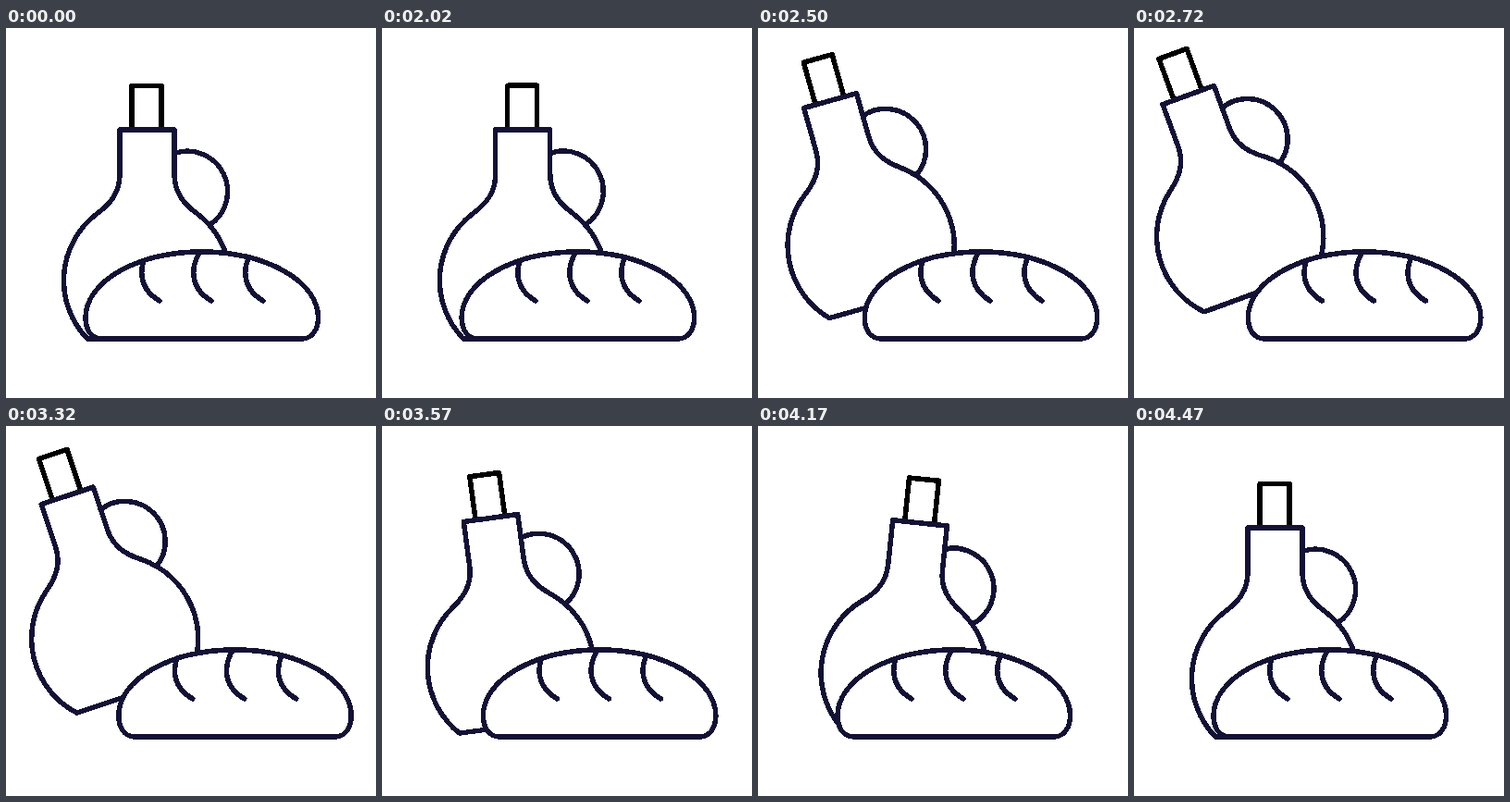
An HTML page with a canvas that plays this animation: 400x400 px, repeating every 4500 ms.

```html
<!DOCTYPE html>
<html lang="en">
<head>
<meta charset="utf-8">
<title>Bottle and bread</title>
<style>
  html, body { margin: 0; width: 100%; height: 100%; overflow: hidden; background: #fff; }
  canvas { display: block; width: 100vmin; height: 100vmin; }
</style>
</head>
<body>
<canvas id="stage" width="400" height="400"></canvas>
<script>
const SIZE = 400;
const ctx = document.getElementById('stage').getContext('2d', { willReadFrequently: true });
const LOOP = 4500;
const NAVY = [19, 18, 52];
const BLACK = [0, 0, 0];
const PIVOT = { x: 213, y: 325 };

const cap = new Path2D('M136 109 V62.5 H168 V109');
const handle = new Path2D('M182 135.5 A43.5 43.5 0 0 1 220 213');
const bottle = new Path2D(
  'M123 110 V158 C123 178 113 190 98 201 A90.5 90.5 0 0 0 88 336 H217 ' +
  'A90.5 90.5 0 0 0 207 201 C192 190 182 178 182 158 V110 Z');
const bread = new Path2D(
  'M104 336 C92 336 86 326 86 313 A125.75 71 0 0 1 337.5 313 C337.5 326 331 336 320 336 Z');
const slash = new Path2D('M209 243 C198 262 201 283 222 295');

// Easing along a curve with horizontal tangents; a and b are the handle positions.
function ease(x, a, b) {
  if (x <= 0) return 0;
  if (x >= 1) return 1;
  let lo = 0, hi = 1;
  for (let i = 0; i < 24; i++) {
    const u = (lo + hi) / 2, v = 1 - u;
    if (3 * a * u * v * v + 3 * b * u * u * v + u * u * u < x) lo = u;
    else hi = u;
  }
  return lo * lo * (3 - 2 * lo);
}

const span = (t, from, to, a, b) => ease((t - from) / (to - from), a, b);

function pose(t) {
  const out = span(t, 2000, 3000, 1 / 3, 1 / 3);
  const slideBack = span(t, 3000, 4000, 2 / 3, 2 / 3);
  const dropBack = span(t, 3000, 3850, 0.72, 0.52);
  const swing = span(t, 3000, 4160, 0.6, 0.4);
  const settle = span(t, 4160, 4490, 1 / 3, 2 / 3);
  return {
    slide: 40 * (out - slideBack),
    lift: out - dropBack,
    angle: -21.5 * out + 27.5 * swing - 6 * settle
  };
}

function stroke(path, color = NAVY) {
  ctx.strokeStyle = `rgb(${color})`;
  ctx.stroke(path);
}

function drawBottle({ lift, angle }) {
  ctx.save();
  ctx.translate(PIVOT.x - 25.3 * lift, PIVOT.y - 76.5 * lift);
  ctx.rotate(angle * Math.PI / 180);
  ctx.translate(-PIVOT.x, -PIVOT.y);
  stroke(cap, BLACK);
  stroke(handle);
  stroke(bottle);
  ctx.restore();
}

function drawBread({ slide }) {
  ctx.save();
  ctx.translate(slide, 0);
  ctx.fillStyle = '#fff';
  ctx.fill(bread);
  ctx.save();
  ctx.clip(bread);
  ctx.translate(-56, 0);
  for (let i = 0; i < 3; i++) {
    stroke(slash);
    ctx.translate(56, 0);
  }
  ctx.restore();
  stroke(bread);
  ctx.restore();
}

// Turns soft edge pixels into solid ink or paper for a hard, stepped outline.
function hardenEdges() {
  const image = ctx.getImageData(0, 0, SIZE, SIZE);
  const px = image.data;
  for (let i = 0; i < px.length; i += 4) {
    if (px[i] === 255) continue;
    const ink = px[i + 2] - px[i] > 4 ? NAVY : BLACK;
    for (let c = 0; c < 3; c++) px[i + c] = px[i] < 196 || c && px[i] !== 255 ? ink[c] : 255;
  }
  ctx.putImageData(image, 0, 0);
}

function frame(now) {
  const state = pose(now % LOOP + 10);
  ctx.fillStyle = '#fff';
  ctx.fillRect(0, 0, SIZE, SIZE);
  ctx.lineWidth = 5;
  ctx.lineCap = ctx.lineJoin = 'round';
  drawBottle(state);
  drawBread(state);
  hardenEdges();
}

const start = performance.now();
function tick() {
  frame(performance.now() - start);
  requestAnimationFrame(tick);
}
tick();
</script>
</body>
</html>
```
